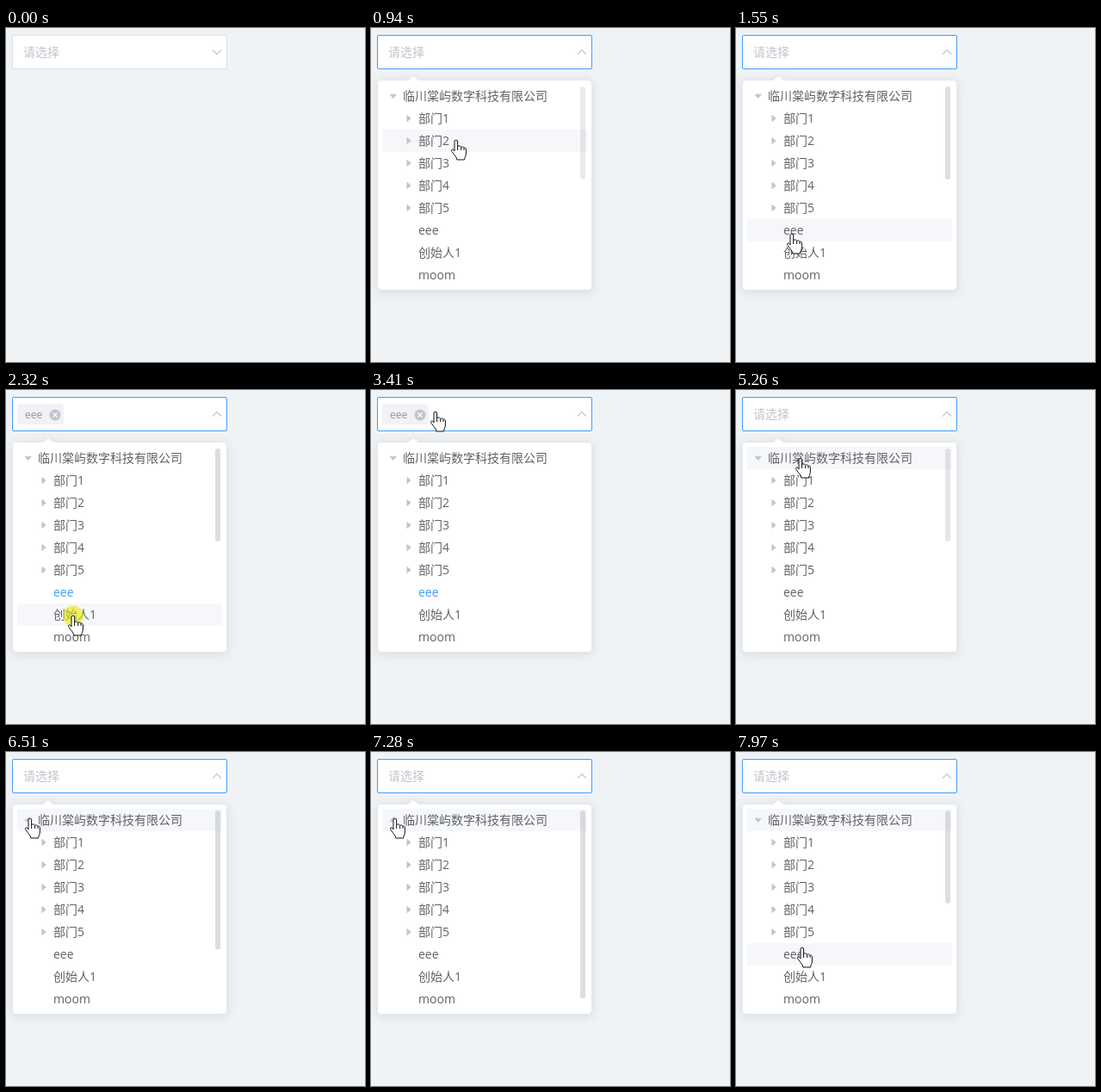
These frames come from a looping animation (417 px wide and 388 px high, 8 s). An HTML page:

```html
<!DOCTYPE html>
<html lang="zh-CN">
<head>
<meta charset="utf-8">
<title>Tree select</title>
<style>
html, body { margin: 0; width: 100%; height: 100%; overflow: hidden; background: #eff3f6; }
svg { display: block; width: 417px; height: 388px; }
text { font: 14px "Open Sans", "Noto Sans CJK SC", "Noto Sans CJK", sans-serif; fill: #606266; }
.tag text { font-size: 12px; fill: #909399; }
.caret { fill: #c0c4cc; stroke: #c0c4cc; stroke-width: .8; stroke-linejoin: round; }
#popup { transform-origin: 132px 56px; }
#panel { filter: drop-shadow(0 2px 6px rgba(0, 0, 0, .1)); }
</style>
</head>
<body>
<svg id="stage" viewBox="0 0 417 388">
  <defs>
    <clipPath id="view"><rect x="8" y="66" width="248" height="234"/></clipPath>
    <clipPath id="fold"><rect id="foldBox" x="8" y="92" width="248" height="458"/></clipPath>
  </defs>
  <rect id="field" x="7.5" y="8.5" width="249" height="39" rx="1.5" fill="#fff"/>
  <text id="hint" x="20" y="33" style="fill:#c0c4cc">请选择</text>
  <path id="chevron" d="M-5-2.5 0 2.5 5-2.5" fill="none" stroke="#c0c4cc" stroke-width="1.1"/>
  <g id="tags"></g>
  <g id="popup">
    <path id="panel" d="M11.5 60.5H43L49 55.5 55 60.5H252.5a4 4 0 0 1 4 4V300.5a4 4 0 0 1-4 4H11.5a4 4 0 0 1-4-4V64.5a4 4 0 0 1 4-4Z" fill="#fff" stroke="#e4e7ed"/>
    <g clip-path="url(#view)">
      <rect id="current" x="13" y="66" width="238" height="26" fill="#f5f7fa"/>
      <rect id="hover" x="13" width="238" height="26" fill="#f5f7fa"/>
      <g id="root"></g>
      <g id="children" clip-path="url(#fold)"></g>
    </g>
    <rect id="thumb" x="243" y="68" width="6" rx="3" fill="#909399"/>
  </g>
  <circle id="press" r="12" fill="#e8e800" opacity=".6"/>
  <g id="hand" stroke="#111" stroke-linejoin="round">
    <path fill="#fff" d="M-2 12V1a1.8 1.8 0 0 1 3.6 0V7c0-1.5 4-1.5 4 .8c0-1.4 3.4-1.2 3.4 1c0-1.2 2.4-1 2.4 1V15c0 3-1.8 4-1.8 7H.8C.8 19-2 17-5 12.5c-1.4-2.6 1-4 3-.5Z"/>
    <path fill="none" d="M1.6 7v4M5.6 8v3M9 9v2"/>
  </g>
</svg>
<script>
const LOOP = 8000, ROW = 26, TOP = 66, CHILD_H = 458, HEAD_H = 36, FADE = 300;
const BLUE = '#409eff', GREY = '#606266';
const $ = id => document.getElementById(id);
const set = (el, attrs) => { for (const k in attrs) el.setAttribute(k, attrs[k]); };
const show = (el, on) => set(el, { visibility: on ? 'visible' : 'hidden' });
const ramp = (t, from, len) => Math.max(0, Math.min(1, (t - from) / len));
const smooth = u => u * u * (3 - 2 * u);
const easeOut = (u, power) => 1 - (1 - u) ** power;
const within = (t, a, b) => t >= a && t < b;

const caret = '<path class="caret" d="M-1.8-3.6 2.5 0-1.8 3.6Z"/>';
const labels = ['部门1', '部门2', '部门3', '部门4', '部门5', 'eee', '创始人1', 'moom'];
$('root').innerHTML = `<g id="rootCaret">${caret}</g><text x="37" y="84">临川棠屿数字科技有限公司</text>`;
$('children').innerHTML = labels.map((label, i) => {
  const y = TOP + ROW * (i + 1.5);
  const mark = label.startsWith('部门') ? `<g transform="translate(43.7 ${y})">${caret}</g>` : '';
  return `${mark}<text x="55" y="${y + 5}">${label}</text>`;
}).join('');
const [memberText, founderText] = [...$('children').querySelectorAll('text')].slice(5);

function makeTag(label, width) {
  const g = document.createElementNS('http://www.w3.org/2000/svg', 'g');
  g.setAttribute('class', 'tag');
  g.innerHTML = `<rect y="16" width="${width}" height="24" rx="4" fill="#f0f2f5"/>
    <text x="9" y="33">${label}</text>
    <circle cx="${width - 10}" cy="29" r="6.5"/>
    <path d="M${width - 12.5} 26.5l5 5m0-5l-5 5" stroke="#fff" stroke-width="1.2"/>`;
  $('tags').append(g);
  return { g, width };
}
const memberTag = makeTag(labels[5], 54);
const founderTag = makeTag(labels[6], 77);

// Release time of each click; the press mark shows for PRESS ms before it
const PRESS = 170, ENTER = 70;
const click = {
  open: 300, addMember: 1930, addFounder: 2490, dropFounder: 3410,
  dropMember: 4880, focusRoot: 5580, fold: 6360, unfold: 7125
};

// The pointer rests at each stop until it leaves for the next; longer trips take longer
const stops = [];
function go(leave, x, y) {
  const last = stops[stops.length - 1] || { x, y };
  stops.push({ leave, x, y, from: last, time: 200 + .9 * Math.hypot(x - last.x, y - last.y) });
}
go(0, 100, 28);
go(645, 99, 131);
go(940, 80, 269);
go(1380, 62, 234);
go(click.addMember, 78, 263);
go(click.addFounder, 75, 26);
go(3800, 57, 28);
go(click.dropMember + 90, 75, 80);
go(5700, 28, 78);
go(7360, 100, 235);
go(7740, 77, 228);

function pointer(t) {
  const { leave, time, from, x, y } = stops.filter(s => s.leave <= t).pop();
  const u = smooth(ramp(t, leave, time));
  return [from.x + (x - from.x) * u, from.y + (y - from.y) * u];
}

function drawTag({ g, width }, on, x, px, py) {
  show(g, on);
  set(g, { transform: `translate(${x} 0)` });
  const hot = Math.hypot(px - x - width + 10, py - 29) < 7;
  set(g.querySelector('circle'), { fill: hot ? '#909399' : '#c0c4cc' });
}

function drawField(t, x, y, member, founder) {
  set($('field'), { stroke: t >= click.open ? BLUE : t >= ENTER ? '#c0c4cc' : '#dcdfe6' });
  show($('hint'), !member);
  const turn = 180 * smooth(ramp(t, click.open, FADE));
  set($('chevron'), { transform: `translate(245 28) rotate(${turn})` });
  drawTag(founderTag, founder, 13, x, y);
  drawTag(memberTag, member, founder ? 19 + founderTag.width : 13, x, y);
}

function drawTree(t, y, member, founder) {
  const zoom = easeOut(ramp(t, click.open, FADE), 5);
  $('popup').style.transform = `scaleY(${zoom})`;
  $('popup').style.opacity = zoom;

  const row = Math.floor((y - TOP) / ROW);
  show($('hover'), row >= 0);
  set($('hover'), { y: TOP + row * ROW });
  show($('current'), t >= click.focusRoot);
  memberText.style.fill = member ? BLUE : GREY;
  founderText.style.fill = founder ? BLUE : GREY;

  const expanded = 1 - smooth(ramp(t, click.fold + 30, FADE)) + smooth(ramp(t, click.unfold + 15, FADE));
  set($('foldBox'), { height: CHILD_H * expanded });
  set($('rootCaret'), { transform: `translate(25.7 79) rotate(${90 * expanded})` });

  // The scroll bar fades with the pointer entering and leaving the popup
  const bar = easeOut(ramp(t, 800, 340), 2) - ramp(t, 2780, 120) + easeOut(ramp(t, 5090, 340), 2);
  const content = HEAD_H + CHILD_H * expanded;
  show($('thumb'), content > 234);
  set($('thumb'), { height: 108 * (HEAD_H + CHILD_H) / content, opacity: .3 * bar });
}

function render(t) {
  const [x, y] = pointer(t);
  const member = within(t, click.addMember, click.dropMember);
  const founder = within(t, click.addFounder, click.dropFounder);
  drawField(t, x, y, member, founder);
  drawTree(t, y, member, founder);
  show($('press'), Object.values(click).some(c => within(t, c - PRESS, c)));
  set($('press'), { cx: x, cy: y - .5 });
  show($('hand'), t >= ENTER);
  set($('hand'), { transform: `translate(${Math.round(x)} ${Math.round(y)})` });
}

const start = performance.now();
function tick(now) {
  render(Math.max(0, now - start) % LOOP);
  requestAnimationFrame(tick);
}
render(0);
requestAnimationFrame(tick);
</script>
</body>
</html>
```
